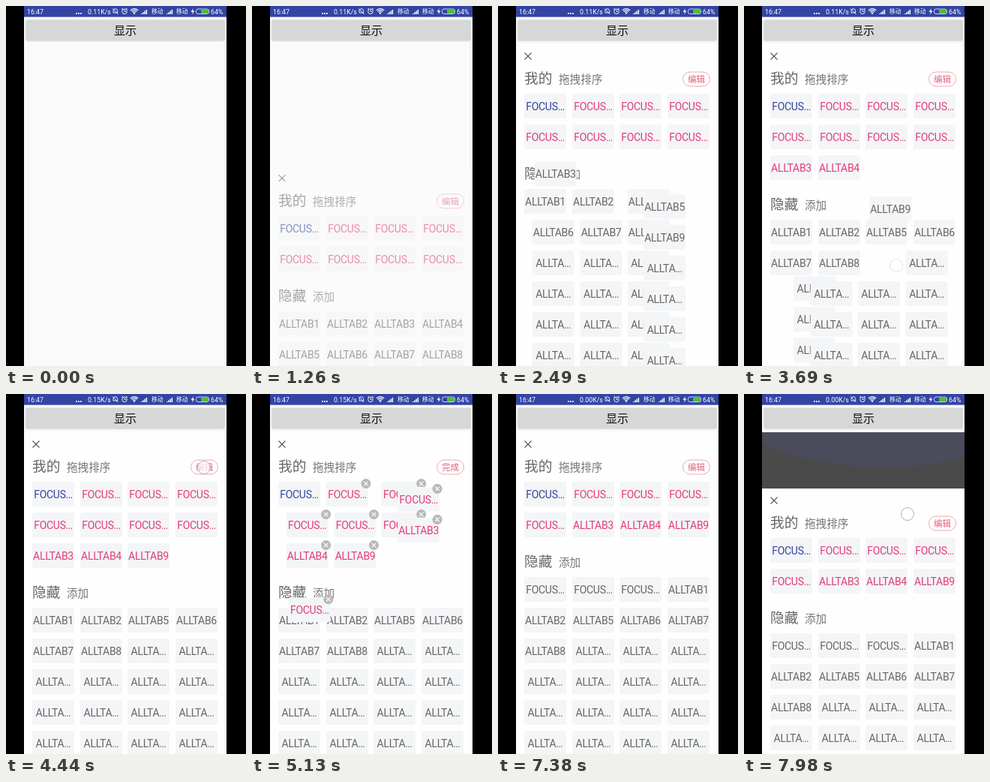
These frames come from a looping animation (320x480 px, 8 s). An HTML page with a canvas:

```html
<!DOCTYPE html>
<html lang="zh">
<head>
<meta charset="utf-8">
<style>
  html, body { margin: 0; width: 100%; height: 100%; overflow: hidden; background: #000; }
  canvas { display: block; width: 320px; height: 480px; }
</style>
</head>
<body>
<canvas id="stage"></canvas>
<script>
const LOOP = 8000, FLIGHT = 360, SHIFT_DELAY = 138, SHIFT = 250;
const COLS = [35, 99, 162, 226], PITCH = 41, MINE_TOP = 117, CELL_W = 56, CELL_H = 33;
const EDIT_ON = 4510, EDIT_OFF = 6790, OPEN = 1019, DRAG = 7560;
const LATIN = 'Roboto, sans-serif';
const CJK = '"Noto Sans CJK SC", "Noto Sans CJK", sans-serif';

// Each tap sends one tab to the other list; "to" is where its flight ends.
const transfers = [
  { t: 2170, add: true, i: 2, to: [35, 203], tap: [203, 264] },
  { t: 2840, add: true, i: 2, to: [107, 199], tap: [203, 305] },
  { t: 3487, add: true, i: 6, to: [171, 199], tap: [203, 346] },
  { t: 4810, i: 2, to: [35, 290], tap: [217, 119] },
  { t: 5430, i: 2, to: [35, 290], tap: [217, 119] },
  { t: 6053, i: 2, to: [42, 271], tap: [217, 119] }
];
const taps = [
  ...transfers.map(e => [e.t, ...e.tap]),
  [EDIT_ON, 264, 98], [EDIT_OFF, 264, 98]
];

const dpr = window.devicePixelRatio || 1;
const canvas = document.getElementById('stage');
canvas.width = 320 * dpr;
canvas.height = 480 * dpr;
const c = canvas.getContext('2d');

const clamp = v => Math.max(0, Math.min(1, v));
const ease = v => (1 - Math.cos(Math.PI * clamp(v))) / 2;
const mix = (a, b, p) => a + (b - a) * p;
const slot = (i, top) => [COLS[i % 4], top + PITCH * Math.floor(i / 4)];

function rect(x, y, w, h, fill) {
  c.fillStyle = fill;
  c.fillRect(x, y, w, h);
}
function round(x, y, w, h, r) {
  c.beginPath();
  c.roundRect(x, y, w, h, r);
}
function circle(x, y, r) {
  c.beginPath();
  c.arc(x, y, r, 0, 7);
}
function fill(color) {
  c.fillStyle = color;
  c.fill();
}
function stroke(color, width) {
  c.strokeStyle = color;
  c.lineWidth = width;
  c.stroke();
}
function line(color, width, ...points) {
  c.beginPath();
  points.forEach(p => c.lineTo(...p));
  stroke(color, width);
}
function cross(x, y, r, color, width) {
  line(color, width, [x - r, y - r], [x + r, y + r]);
  line(color, width, [x + r, y - r], [x - r, y + r]);
}
function text(s, x, y, size, color, align = 'left', family = LATIN, spacing = 0) {
  c.font = `${size}px ${family}`;
  c.letterSpacing = spacing + 'px';
  c.fillStyle = color;
  c.textAlign = align;
  c.fillText(s, x, y);
}

function signal(x) {
  for (let i = 0; i < 4; i++) rect(x + i * 2.2, 10 - i * 1.7, 1.5, 1 + i * 1.7, '#fff');
}

function statusBar(t) {
  const speed = t < 4000 ? '0.11' : t < 7000 ? '0.15' : '0.00';
  rect(24, 0, 270, 14.6, '#3344a4');
  text('16:47', 28, 10.7, 8.8, '#fff');
  for (let i = 0; i < 3; i++) rect(93 + i * 3, 9, 1.8, 1.8, '#fff');
  text(speed + 'K/s', 109, 10.7, 8.8, '#fff');

  // muted bell
  c.beginPath();
  c.moveTo(143, 9);
  c.lineTo(143, 6.5);
  c.arc(145.8, 6.5, 2.8, Math.PI, 0);
  c.lineTo(148.6, 9);
  c.closePath();
  stroke('#fff', 0.9);
  line('#fff', 0.9, [142, 3.5], [149.5, 11]);

  // alarm clock
  circle(158, 7.3, 3.3);
  stroke('#fff', 0.9);
  line('#fff', 0.9, [158, 5.3], [158, 7.5], [159.8, 7.5]);
  line('#fff', 0.9, [154, 4.5], [156, 3]);
  line('#fff', 0.9, [160, 3], [162, 4.5]);

  // wifi
  for (const r of [2.5, 4.7, 6.9]) {
    c.beginPath();
    c.arc(171, 10.5, r, -Math.PI * .77, -Math.PI * .23);
    stroke('#fff', 1.2);
  }
  circle(171, 10, 1);
  fill('#fff');

  signal(180);
  text('移动', 194, 10.3, 7.8, '#fff', 'left', CJK);
  signal(214);
  text('移动', 227, 10.3, 7.8, '#fff', 'left', CJK);

  // charging battery
  c.beginPath();
  [[250, 3], [246.5, 7.8], [249, 7.8], [248, 11.5], [251.5, 6.5], [249, 6.5]]
    .forEach(p => c.lineTo(...p));
  fill('#fff');
  round(253.5, 4, 17, 6.5, 2.5);
  stroke('#dfe3ff', 0.9);
  round(260, 4.6, 10, 5.3, 1.5);
  fill('#4fc12d');
  text('64%', 273, 10.7, 8.8, '#fff');
}

function showButton(t) {
  c.save();
  c.shadowColor = 'rgba(0,0,0,.2)';
  c.shadowBlur = 2 * dpr;
  c.shadowOffsetY = 0.5 * dpr;
  round(26.5, 18.5, 265, 27.5, 2);
  fill('#d6d7d7');
  c.restore();
  if (t > 20 && t < 430) {
    c.save();
    round(26.5, 18.5, 265, 27.5, 2);
    c.clip();
    circle(239, 34, 20 + 220 * clamp((t - 20) / 250));
    fill(`rgba(0,0,0,${.12 * clamp((430 - t) / 180)})`);
    c.restore();
  }
  text('显示', 159, 38, 15, '#111', 'center', CJK);
}

function drawTab(item, x, y, mine, editing) {
  const color = !mine ? '#666' : item.first ? '#33459b' : '#e23d77';
  round(x, y, CELL_W, CELL_H, 3);
  fill('#f4f5f7');
  text(item.name, x + 28, y + 22, 14, color, 'center', LATIN, -0.3);
  if (mine && editing && !item.first) {
    circle(x + 53, y + 2.5, 6.5);
    fill('#b9b9b9');
    cross(x + 53, y + 2.5, 2.7, '#fff', 1.2);
  }
}

// Lists, pending shifts and the flying tab at time t.
function lists(t) {
  const mine = Array.from({ length: 8 }, (_, i) => ({ name: 'FOCUS…', first: !i }));
  const hidden = Array.from({ length: 48 }, (_, i) => ({ name: i < 9 ? 'ALLTAB' + (i + 1) : 'ALLTA…' }));
  const state = { mine, hidden };
  for (const e of transfers) {
    if (t < e.t) break;
    const source = e.add ? hidden : mine;
    const top = e.add ? MINE_TOP + PITCH * Math.ceil(mine.length / 4) + 45 : MINE_TOP;
    const [item] = source.splice(e.i, 1);
    const age = t - e.t;
    if (age < SHIFT_DELAY + SHIFT) {
      state.shift = { list: source, from: e.i, p: ease((age - SHIFT_DELAY) / SHIFT) };
    }
    if (age >= FLIGHT) {
      if (e.add) mine.push(item); else hidden.unshift(item);
    } else {
      const [x, y] = slot(e.i, top), p = age / FLIGHT;
      state.fly = { item, mine: !e.add, x: mix(x, e.to[0], p), y: mix(y, e.to[1], p) };
    }
  }
  return state;
}

function drawList(list, top, mine, editing, shift) {
  list.forEach((item, i) => {
    let [x, y] = slot(i, top);
    if (shift && shift.list === list && i >= shift.from) {
      const [ox, oy] = slot(i + 1, top);
      x = mix(ox, x, shift.p);
      y = mix(oy, y, shift.p);
    }
    if (y < 480) drawTab(item, x, y, mine, editing);
  });
}

function heading(title, hint, y) {
  text(title, 35, y + 7, 18.7, '#666', 'left', CJK);
  text(hint, 81, y + 7, 14.6, '#777', 'left', CJK);
}

function panel(t) {
  const editing = t >= EDIT_ON && t < EDIT_OFF;
  const { mine, hidden, shift, fly } = lists(t);
  const mineEnd = MINE_TOP + PITCH * Math.ceil(mine.length / 4);

  rect(24, 51, 270, 480, '#fefefe');
  cross(40, 67, 4.5, '#555', 1.1);
  heading('我的', '拖拽排序', 96);
  round(246.5, 88, 36, 19, 9.5);
  stroke('#f0a8b2', 1);
  text(editing ? '完成' : '编辑', 264.5, 102, 11.5, '#e0607a', 'center', CJK);

  heading('隐藏', '添加', mineEnd + 24);
  drawList(hidden, mineEnd + 45, false, false, shift);

  c.save();
  c.beginPath();
  c.rect(24, 110, 270, mineEnd - 3 - 110);
  c.clip();
  drawList(mine, MINE_TOP, true, editing, shift);
  c.restore();

  if (fly) drawTab(fly.item, fly.x, fly.y, fly.mine, editing);
}

function pointer(x, y, alpha) {
  if (alpha <= 0) return;
  circle(x, y, 8.5);
  fill(`rgba(255,255,255,${.7 * alpha})`);
  stroke(`rgba(150,150,160,${.75 * alpha})`, 1);
}

function scrim(pull) {
  const y = v => 51 + (v - 51) * pull;
  rect(24, 51, 270, 429, '#4a4a4b');
  c.beginPath();
  c.moveTo(24, 51);
  c.lineTo(24, y(67));
  c.quadraticCurveTo(159, y(118), 294, y(85));
  c.lineTo(294, 51);
  fill('#4a4c5b');
}

function draw(t) {
  c.setTransform(dpr, 0, 0, dpr, 0, 0);
  rect(0, 0, 320, 480, '#000');
  rect(24, 0, 270, 480, '#fafafa');
  statusBar(t);
  showButton(t);

  const pull = clamp((t - DRAG) / (7980 - DRAG)) ** 1.4;
  if (t >= OPEN) {
    const k = (t - OPEN) / 630;
    if (pull > 0) scrim(pull);
    c.save();
    c.beginPath();
    c.rect(24, 51, 270, 429);
    c.clip();
    c.globalAlpha = clamp(k * 1.5);
    c.translate(0, 240 * (1 - ease(k)) + 75 * pull);
    panel(t);
    c.restore();
  }

  if (t > 20 && t < 630) pointer(239, 34, clamp((630 - t) / 250));
  for (const [at, x, y] of taps) {
    if (t > at - 90 && t < at + 290) pointer(x, y, clamp((at + 290 - t) / 250));
  }
  if (t > DRAG - 100) pointer(218, 85 + 75 * pull, 1);
}

function tick() {
  draw(performance.now() % LOOP);
  requestAnimationFrame(tick);
}
tick();
</script>
</body>
</html>
```
